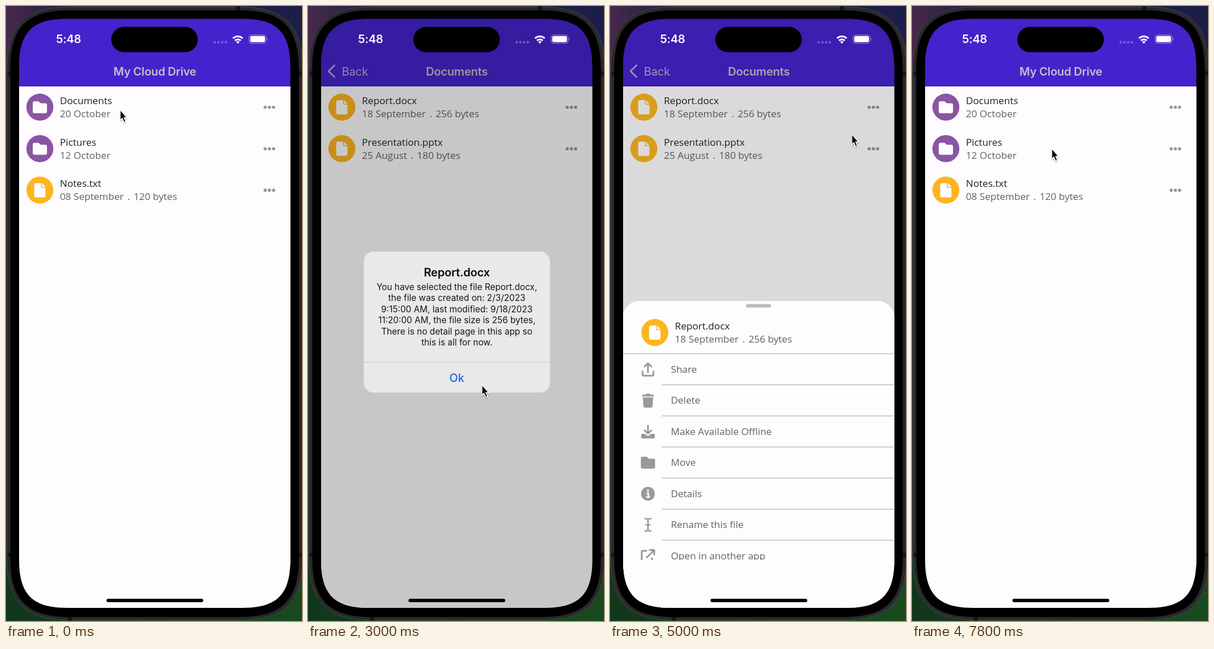
Write an HTML page that moves like this. It is 520 px wide and 1078 px high and loops after 8 s.

```html
<!DOCTYPE html>
<html lang="en">
<head>
<meta charset="utf-8">
<title>File manager demo</title>
<style>
  html, body { margin: 0; width: 100%; height: 100%; overflow: hidden; background: #1c1c20; }
  svg { display: block; width: 100%; height: 100%; }
  text { font: 17.1px "Open Sans", sans-serif; fill: #616165; }
  .name { fill: #202022; }
  .ui { font-family: Inter, sans-serif; font-size: 20px; }
  .bold { font-weight: 600; letter-spacing: -.01em; }
  .mid { text-anchor: middle; }
  .title { fill: #c4bfca; }
  .message { font-size: 15.3px; fill: #161618; }
  .glyph { fill: #9a9a9e; }
  .line { fill: none; stroke: #9a9a9e; stroke-width: 3; stroke-linecap: round; stroke-linejoin: round; }
  .rule { stroke: #bdbcc0; stroke-width: 1.4; }
</style>
</head>
<body>
<svg id="stage" viewBox="0 0 520 1078"></svg>
<script>
const FOLDER = 'M-12.5-7.5a3 3 0 0 1 3-3h6.2q1.2 0 2 .9l1.6 1.7q.8.9 2 .9h7.2a3 3 0 0 1 3 3V7.5a3 3 0 0 1-3 3h-19a3 3 0 0 1-3-3z';
const FILE = 'M-7-12.5H2v6q0 2 2 2h5.8V9.5a3 3 0 0 1-3 3H-7a3 3 0 0 1-3-3v-19a3 3 0 0 1 3-3zM3.6-12.5L9.8-6H3.6z';

const at = (x, y, body) => `<g transform="translate(${x} ${y})">${body}</g>`;

// Rectangle whose corners ease into the sides instead of being plain arcs.
function smoothRect(x, y, w, h, r) {
  const d = 1.28 * r, c = .354 * r, k = d - c;
  return `M${x + d} ${y}h${w - 2 * d}c${k} 0 ${d} ${c} ${d} ${d}v${h - 2 * d}c0 ${k} ${-c} ${d} ${-d} ${d}
    h${2 * d - w}c${-k} 0 ${-d} ${-c} ${-d} ${-d}v${2 * d - h}c0 ${-k} ${c} ${-d} ${d} ${-d}z`;
}

function entry(name, date, size) {
  const isFile = Boolean(size);
  const detail = isFile ? `<tspan dx="2"> .</tspan><tspan dx="2"> ${size}</tspan>` : '';
  return `<circle cx="59.5" cy="177.3" r="23.7" fill="${isFile ? '#fdb51f' : '#8a55a4'}"/>
    ${at(59.5, 177.5, `<path fill="#fefdfe" d="${isFile ? FILE : FOLDER}"/>`)}
    <text class="name" x="94.8" y="172">${name}</text>
    <text x="94.8" y="195">${date}${detail}</text>`;
}

function page(id, files) {
  const rows = files.map((file, i) => at(0, i * 72.7, `
    <rect ${i ? '' : `id="${id}Press"`} x="23" y="141" width="477" height="72.7" fill="#808083" opacity="0"/>
    <circle cx="462.7" cy="177.3" r="23.6" fill="#fefdfe"/>
    ${[455.3, 462.7, 470.1].map(x => `<circle cx="${x}" cy="177.5" r="2.8" fill="#97979c"/>`).join('')}
    ${entry(...file)}`));
  return `<g id="${id}"><rect x="22" y="141" width="478" height="920" fill="#fefcfe"/>${rows.join('')}</g>`;
}

const actions = [
  ['Share', '<path class="line" d="M-9.5 3.5V9q0 2 2 2h15q2 0 2-2V3.5M0 5V-10M-6-5L0-10.5L6-5"/>'],
  ['Delete', '<path class="glyph" d="M-10.5-10h6l1-2h7l1 2h6v3h-21zM-9-5.5H9L8 10q-.2 2.5-2.5 2.5h-11Q-7.8 12.5-8 10z"/>'],
  ['Make Available Offline', '<path class="line" d="M0-10.5V3M-6-2L0 3.5L6-2"/><path class="glyph" d="M-12 5.5q0-1.5 1.5-1.5h5L0 8l5.5-4h5q1.5 0 1.5 1.5V10q0 2-2 2h-20q-2 0-2-2z"/>'],
  ['Move', `<path class="glyph" d="${FOLDER}"/>`],
  ['Details', '<circle class="glyph" r="12.2"/><path d="M-2.5-1H.5V5.5M-3 5.8H3.5" fill="none" stroke="#fff" stroke-width="2.6"/><circle cy="-5.5" r="1.9" fill="#fff"/>'],
  ['Rename this file', '<path class="line" style="stroke-width:2.6" d="M-5-11q5 0 5 4V7q0 4-5 4M5-11q-5 0-5 4V7q0 4 5 4M-3.5 0h7"/>'],
  ['Open in another app', '<path class="line" d="M-3-9h-6q-2 0-2 2V9q0 2 2 2H5q2 0 2-2V4M3-10.5h8v8M10.5-10L-2 2.5"/>']
];

const sheet = `<path d="M22 1640V536a30 30 0 0 1 30-30H470a30 30 0 0 1 30 30V1640z" fill="#fefdfe"/>
  <rect x="239" y="511.5" width="44" height="6" rx="3" fill="#bab9bc"/>
  ${at(19.3, 384, entry('Report.docx', '18 September', '256 bytes'))}
  <path class="rule" d="M23 598.5H500"/>
  <g clip-path="url(#listClip)">${actions.map(([label, icon], i) => at(0, i * 54.5, `
    ${at(66.7, 626, icon)}<text x="107" y="632">${label}</text><path class="rule" d="M91 653H500"/>`)).join('')}</g>`;

const message = ['You have selected the file Report.docx,', 'the file was created on: 2/3/2023',
  '9:15:00 AM, last modified: 9/18/2023', '11:20:00 AM, the file size is 256 bytes,',
  'There is no detail page in this app so', 'this is all for now.'];

const dialog = `<rect x="98" y="430.5" width="327" height="247" rx="17" fill="#e9e8ea"/>
  <text class="ui bold mid" x="261.5" y="474" style="fill:#0c0c0e">Report.docx</text>
  ${message.map((line, i) => `<text class="ui message mid" x="261.5" y="${498 + i * 19.4}">${line}</text>`).join('')}
  <path d="M98 624.5H425" stroke="#c9c8cb"/>
  <text class="ui mid" x="261.5" y="658.5" style="fill:#1a6ce6;font-weight:500">Ok</text>`;

const statusBar = `<rect x="185" y="36.5" width="152" height="44.5" rx="22.2"/>
  <text class="ui bold mid" x="110" y="65" style="fill:#fff">5:48</text>
  ${[366.6, 373.2, 379.8, 386.2].map(x => `<circle cx="${x}" cy="63.5" r="2.2" fill="#fff" opacity=".28"/>`).join('')}
  <path d="M398.8 56.7a12 12 0 0 1 17 0M402.3 60.6a7 7 0 0 1 10 0" fill="none" stroke="#fff" stroke-width="3"/>
  <path d="M407.3 66l-2.9-3a4.2 4.2 0 0 1 5.8 0z" fill="#fff"/>
  <rect x="427" y="50.5" width="30" height="15" rx="5" fill="none" stroke="#fff" stroke-opacity=".45" stroke-width="1.2"/>
  <rect x="429" y="52.5" width="26" height="11" rx="3.3" fill="#fff"/>
  <path d="M458.7 55.5q2 2.5 0 5z" fill="#fff" opacity=".5"/>`;

stage.innerHTML = `<defs>
    <clipPath id="screenClip"><path d="${smoothRect(23, 22.5, 476.5, 1032.5, 66)}"/></clipPath>
    <clipPath id="listClip"><rect x="23" y="598" width="477" height="362"/></clipPath>
    <linearGradient id="sky"><stop stop-color="#47294b"/><stop offset=".18" stop-color="#231f48"/><stop offset="1" stop-color="#1c1e4a"/></linearGradient>
    <linearGradient id="grass"><stop stop-color="#12361a"/><stop offset="1" stop-color="#1a4a1f"/></linearGradient>
    <filter id="shadow" x="-50%" y="-50%" width="200%" height="200%"><feDropShadow dx="0" dy="1.5" stdDeviation="1.3" flood-opacity=".35"/></filter>
  </defs>
  <rect width="520" height="120" fill="url(#sky)"/>
  <rect y="950" width="520" height="128" fill="url(#grass)"/>
  <path d="${smoothRect(1.5, 1.5, 519.5, 1075, 88)}" fill="#29292b" stroke="#48484b"/>
  <path d="M408 1v7M112 1070v7M2 118h6M2 962h6M514 118h6M514 962h6" stroke="#151517" stroke-width="7"/>
  <path d="${smoothRect(7.5, 7.5, 507, 1063.5, 82)}"/>
  <g clip-path="url(#screenClip)">
    ${page('home', [['Documents', '20 October'], ['Pictures', '12 October'], ['Notes.txt', '08 September', '120 bytes']])}
    ${page('docs', [['Report.docx', '18 September', '256 bytes'], ['Presentation.pptx', '25 August', '180 bytes']])}
    <rect x="22" y="22" width="478" height="119" fill="#4523cc"/>
    <text id="homeTitle" class="ui bold mid title" x="261.5" y="121.5">My Cloud Drive</text>
    <text id="docsTitle" class="ui bold mid title" x="261.5" y="121.5">Documents</text>
    <g id="back"><path d="M46.5 104L36 114.3L46.5 124.5" fill="none" stroke="#b5add4" stroke-width="2.6" stroke-linecap="round" stroke-linejoin="round"/>
      <text class="ui" x="59.5" y="121.5" style="fill:#b5add4;letter-spacing:-.01em">Back</text></g>
    <rect id="dim" x="22" y="22" width="478" height="1034"/>
    <g id="sheet">${sheet}</g>
    <g id="dialog">${dialog}</g>
    <rect x="176.5" y="1039" width="170" height="6" rx="3"/>
  </g>
  ${statusBar}
  <g id="cursor"><path d="M.6 0V18.3L4.3 14.7L7.2 21.6L10.2 20.3L7.4 13.5H12.4z" stroke="#fff" stroke-width="1.3" filter="url(#shadow)"/></g>`;

// Each track is a list of [time in ms, value], linear in between.
const tracks = {
  push: [[400, 0], [600, .55], [800, .97], [1000, 1], [6600, 1], [6800, .5], [7000, .04], [7200, 0]],
  homePress: [[200, 0], [400, 1], [600, 1], [1000, 0]],
  docsPress: [[1600, 0], [1800, 1], [2000, 1], [2400, 0]],
  alert: [[1800, 0], [2000, 1], [3200, 1], [3400, .35], [3600, 0]],
  zoom: [[1800, 1.15], [2000, 1.02], [2200, 1]],
  sheet: [[4400, 0], [4600, .126], [4800, .8], [5000, .98], [5200, 1], [5800, 1], [6000, .55], [6200, .05], [6400, 0]],
  back: [[6400, 1], [6600, .2], [6800, .2]],
  x: [[2400, 200], [3000, 305], [3400, 305], [4200, 462], [4800, 462], [5600, 311], [6000, 311], [6600, 47], [7000, 47], [7800, 245]],
  y: [[2400, 182], [3000, 664], [3400, 664], [4200, 169], [4800, 169], [5600, 392], [6000, 392], [6600, 109], [7000, 109], [7800, 250]]
};

function valueAt(track, t) {
  const next = track.findIndex(([time]) => time > t);
  if (next < 0) return track.at(-1)[1];
  if (next === 0) return track[0][1];
  const [[t0, a], [t1, b]] = [track[next - 1], track[next]];
  return a + (b - a) * (t - t0) / (t1 - t0);
}

const el = id => document.getElementById(id);
const move = (id, x, y = 0) => el(id).setAttribute('transform', `translate(${x} ${y})`);
const fade = (id, opacity) => el(id).setAttribute('opacity', opacity);

function draw(now) {
  const t = Math.floor(now % 8000 / 200) * 200;
  const v = Object.fromEntries(Object.entries(tracks).map(([key, track]) => [key, valueAt(track, t)]));
  move('home', -140 * v.push);
  move('docs', 477 * (1 - v.push));
  move('homeTitle', -150 * v.push);
  move('docsTitle', 190 * (1 - v.push));
  fade('homeTitle', 1 - v.push);
  fade('docsTitle', v.push);
  fade('back', v.push * v.back);
  fade('homePress', v.homePress);
  fade('docsPress', v.docsPress);
  fade('dim', .21 * v.alert + .14 * v.sheet);
  move('sheet', 0, 549 * (1 - v.sheet));
  fade('dialog', v.alert);
  el('dialog').setAttribute('transform', `translate(261.5 554) scale(${v.zoom}) translate(-261.5 -554)`);
  move('cursor', v.x, v.y);
  requestAnimationFrame(draw);
}
requestAnimationFrame(draw);
</script>
</body>
</html>
```
